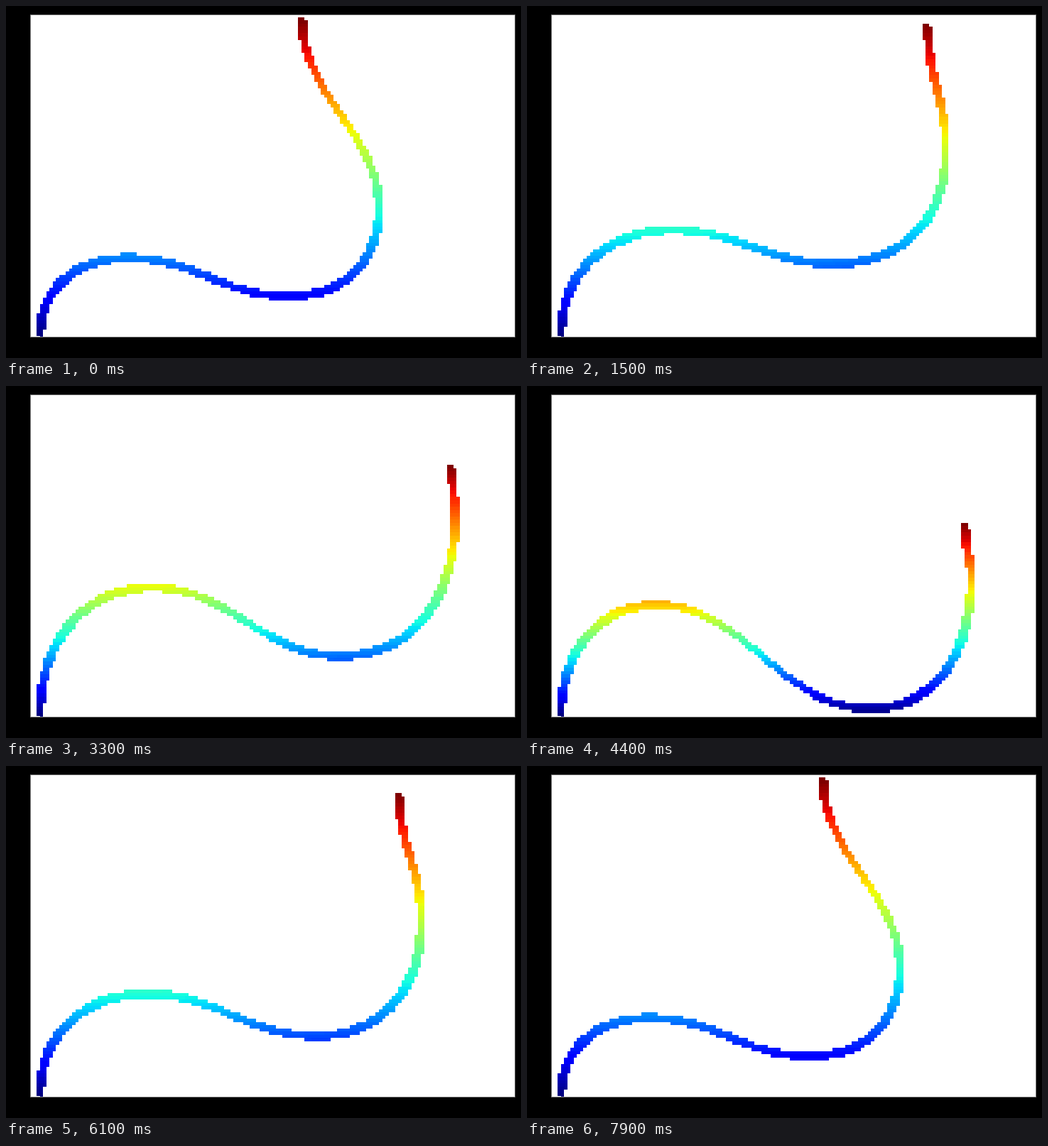
These frames come from a looping animation (725 by 496 pixels, 8000 ms). A matplotlib script:

```python
import numpy as np
import matplotlib.pyplot as plt
from matplotlib.animation import FuncAnimation

W, H = 725, 496
LEFT, RIGHT, TOP, BOTTOM = 34, 716, 12, 466
COLS, ROWS = 150, 100
CELL_X, CELL_Y = (RIGHT - LEFT) / COLS, (BOTTOM - TOP) / ROWS
BASE = 465.2            # lower edge of grid row 0
FRAMES, INTERVAL = 80, 100
JET = plt.get_cmap("jet")

# rod at the corners of the tip's path: crest, trough, right bend, tip
START = (48, 463)
BENT = [(172, 355), (398, 409), (525, 285), (417, 20)]
TAUT = [(227, 259), (457, 297), (633, 86), (629, 34)]
LOW = [(184, 306), (485, 455), (631, 275), (626, 207)]
NEAR = [(176, 326), (459, 454), (582, 262), (554, 134)]
HIGH = [(203, 320), (433, 366), (585, 208), (554, 25)]

# first and last frame, poses, easing power of: tip, bends in x, bends in y
LEGS = [
    (0, 23, BENT, TAUT, 0.85, 1.2, 2.1),
    (24, 43, TAUT, LOW, 1, 1, 0.85),
    (43, 51, LOW, NEAR, 1, 1, 1),
    (51, 63, NEAR, HIGH, 1, 1, 1),
    (64, 79, HIGH, BENT, 1, 0.9, 0.7),
]


def pose(i):
    first, last, a, b, tip, bend_x, bend_y = next(g for g in LEGS if i <= g[1])
    w = (i - first) / (last - first)
    ease = np.array([(w**bend_x, w**bend_y)] * 3 + [(w**tip, w**tip)])
    a, b = np.array(a), np.array(b)
    return a + (b - a) * ease


def bezier(p0, p3, k, flat0, flat3, n=500):
    """Curve whose ends are level (flat) or upright, handles k of the span."""
    d = k * (p3 - p0)
    axis = np.eye(2)
    p1 = p0 + d * axis[0 if flat0 else 1]
    p2 = p3 - d * axis[0 if flat3 else 1]
    t = np.linspace(0, 1, n)[:, None]
    s = 1 - t
    return s**3 * p0 + 3 * s * s * t * p1 + 3 * s * t * t * p2 + t**3 * p3


def rod(i):
    crest, trough, bend, tip = pose(i)
    return np.vstack([
        bezier(np.array(START), crest, 0.59, False, True),
        bezier(crest, trough, 0.41, True, True),
        bezier(trough, bend, 0.61, True, False),
        bezier(bend, tip, 0.4, False, False),
    ])


def raster(i):
    pts = rod(i)
    # slanted brush, longer along the falling diagonal
    along, across = np.meshgrid(np.linspace(-0.55, 0.55, 5), [-0.22, 0, 0.22])
    dx, dy = (across + along).ravel(), (across - along).ravel()
    col = np.floor((pts[:, 0, None] - LEFT) / CELL_X + dx).astype(int)
    row = np.floor((BASE - pts[:, 1, None]) / CELL_Y + dy).astype(int)
    row = np.clip(row, -1, ROWS - 1)

    # hue follows height, slightly raised along the left arch
    x = LEFT + (np.arange(COLS) + 0.5) * CELL_X
    gain = 0.04 + 0.18 * (pts[-1, 0] - BENT[3][0]) / 209
    fade = np.clip((470 - x) / 250, 0, 1)
    level = np.arange(-1, ROWS)[:, None] / row.max() * (1 + gain * fade)
    img = JET(np.clip(level, 0, 1))
    img[..., 3] = 0
    img[row + 1, col, 3] = 1
    return img


fig = plt.figure(figsize=(W / 100, H / 100), dpi=100, facecolor="black")
ax = fig.add_axes([LEFT / W, 1 - BOTTOM / H, (RIGHT - LEFT) / W, (BOTTOM - TOP) / H])
ax.set_facecolor("white")
ax.spines[:].set(color="gray", linewidth=0.72)
pic = ax.imshow(raster(0), origin="lower", interpolation="nearest", aspect="auto",
                extent=(LEFT, RIGHT, BASE + CELL_Y, BASE - ROWS * CELL_Y))
ax.set(xlim=(LEFT, RIGHT), ylim=(BOTTOM, TOP), xticks=[], yticks=[])


def update(i):
    pic.set_data(raster(i))
    return [pic]


anim = FuncAnimation(fig, update, frames=FRAMES, interval=INTERVAL,
                     repeat=True, repeat_delay=0)
plt.show()
```
